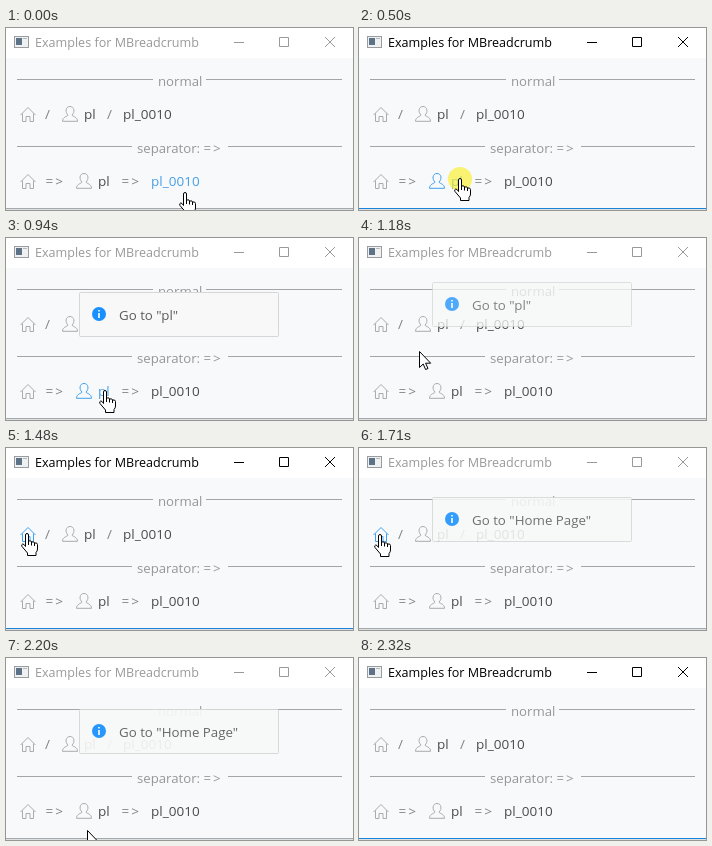
An HTML page for the animation above (2390 ms loop, 347 px wide and 182 px high).

```html
<!DOCTYPE html>
<html lang="en">
<head>
<meta charset="utf-8">
<title>Breadcrumb</title>
<style>
  html, body { margin: 0; width: 100%; height: 100%; overflow: hidden; background: #f7f9fa; }
  svg { display: block; }
  text { font: 13.5px "Open Sans", "Noto Sans", sans-serif; white-space: pre; }
  #win { --chrome: #999; --edge: #a5a9ac; }
  #win.active { --chrome: #000; --edge: #1883d7; }
  .title { font-size: 12.57px; fill: var(--chrome); }
  .buttons { stroke: var(--chrome); fill: none; }
  .edge { fill: var(--edge); }
  .rule { stroke: #a3a5a6; }
  .head { font-size: 13.2px; fill: #959797; }
  .sep { fill: #808284; }
  .arrow { letter-spacing: 2px; }
  .item { fill: #4c4c4c; stroke: none; }
  .item use { stroke: #a9abac; fill: none; }
  .item.hover { fill: #4a9fe8; }
  .item.hover use { stroke: #40a0f0; }
  .note text { font-size: 13.3px; fill: #5c5c5c; }
  .cursor { fill: #fff; stroke: #000; stroke-linejoin: round; }
</style>
</head>
<body>
<svg id="win" width="347" height="182" viewBox="0 0 347 182">
  <defs>
    <g id="home" stroke-linejoin="round">
      <path d="M-7.5 1L0-6.5 7.5 1M-5.5-.5V7.5H-2V2.5H2V7.5H5.5V-.5"/>
    </g>
    <g id="user">
      <path d="M-2 1C-5-1.5-4.7-7.5 0-7.5S5-1.5 2 1C2 2.5 7.5 2.5 7.5 7.3H-7.5C-7.5 2.5-2 2.5-2 1Z"/>
    </g>
  </defs>

  <rect width="347" height="182" fill="#f7f9fa"/>
  <rect width="347" height="30" fill="#fff"/>
  <g>
    <rect x="8.5" y="8.5" width="14" height="11" fill="#eef0f2" stroke="#9a9da0"/>
    <rect x="10" y="10" width="6" height="7" fill="#5d7287"/>
    <path d="M17 10.5H21" stroke="#b5b8ba"/>
  </g>
  <text class="title" x="29" y="19">Examples for MBreadcrumb</text>
  <path class="buttons" d="M228 14.5H238M273.5 9.5H282.5V18.5H273.5ZM319 9L329 19M329 9L319 19"/>

  <path class="rule" d="M11 51.5H147M200 51.5H336M11 118.5H126M222 118.5H336"/>
  <text class="head" x="152" y="58">normal</text>
  <text class="head" x="131" y="125">separator: <tspan class="arrow">=&gt;</tspan></text>

  <g id="crumbs"></g>

  <rect y="181" width="347" height="1" fill="#dde1e4"/>
  <rect class="edge" y="180" width="347" height="1"/>

  <g id="note" class="note">
    <rect x="73.5" y="54.5" width="199" height="44" rx="1" fill="#f8f8f8" stroke="#d6d6d6"/>
    <circle cx="93" cy="76" r="7" fill="#1890ff"/>
    <path d="M93 72V73.6M93 75V80" stroke="#fff" stroke-width="1.6"/>
    <text id="msg" x="113" y="82"></text>
  </g>

  <g id="pointer">
    <circle id="click" cy="1" r="12" fill="#faf028" opacity=".65"/>
    <path id="tip" class="cursor" d="M.5 .5V16.5L4.2 13 6.6 18.5 9 17.5 6.6 12.2H11.7Z"/>
    <g id="hand" class="cursor" transform="translate(-6 0)">
      <path d="M4.5 13.5V2Q4.5 .5 6 .5T7.5 2V8Q10.5 7.2 10.5 9 13.5 8.3 13.5 10 16.5 9.5 16.5 11.5V16Q16.5 18 15 19.5V22.5H6.5V20L1 13.5Q0 11.5 1.7 11 3 10.8 4.5 13.5Z"/>
      <path d="M7.5 8V12M10.5 9V12.5M13.5 10V13" fill="none"/>
    </g>
  </g>
</svg>
<script>
const LOOP = 2390, STEP = 30;
const $ = id => document.getElementById(id);

// Spans in which the picture advances in steps; it rests in between.
const spans = [[0, 0], [30, 300], [500, 500], [600, 780], [940, 1450],
               [1480, 1480], [1580, 1580], [1650, 1800], [1990, 2320]];

// Pointer path: time, x, y
const path = [[0, 179, 164], [300, 103, 151], [500, 101, 150], [780, 101, 150],
              [940, 99, 152], [1180, 60, 113], [1450, 21, 86], [1480, 21, 85],
              [1580, 21, 86], [1990, 21, 87], [2230, 90, 184], [2390, 90, 200]];

const clicks = [[500, 600], [1580, 1650]];
const idle = [[0, 30], [630, 1270], [1650, 2320]];
const notes = [
  { text: 'Go to "pl"', open: 600, close: 1090 },
  { text: 'Go to "Home Page"', open: 1620, close: 2140 }
];

const rows = [
  { y: 86, sep: "/", seps: [39, 101], home: 22, user: 64, pl: 78, last: 117 },
  { y: 153, sep: "=&gt;", seps: [39.5, 115.5], home: 22, user: 78, pl: 92, last: 145 }
];

const label = (x, y, s, cls = "") => `<text class="${cls}" x="${x}" y="${y + 5}">${s}</text>`;
const icon = (name, x, y) => `<use href="#${name}" x="${x}" y="${y}"/>`;

const zones = [];
function item(x0, x1, y, body) {
  zones.push({ x0, x1, y });
  return `<g class="item">${body}</g>`;
}

$("crumbs").innerHTML = rows.map(r =>
  item(r.home - 10, r.home + 11, r.y, icon("home", r.home, r.y)) +
  item(r.user - 10, r.pl + 14, r.y, icon("user", r.user, r.y) + label(r.pl, r.y, "pl")) +
  item(r.last - 2, r.last + 52, r.y, label(r.last, r.y, "pl_0010")) +
  r.seps.map(x => label(x, r.y, r.sep, "sep arrow")).join("")
).join("");
const items = document.querySelectorAll(".item");

const within = (list, t) => list.some(([a, b]) => t >= a && t < b);
const clamp = v => Math.min(1, Math.max(0, v));
const outCubic = p => 1 - (1 - p) ** 3;
const show = (el, on) => el.setAttribute("visibility", on ? "visible" : "hidden");

function snap(t) {
  const [a, b] = spans.filter(s => s[0] <= t).pop();
  return Math.min(b, a + Math.floor((t - a) / STEP) * STEP);
}

function pointerAt(t) {
  const i = Math.max(1, path.findIndex(p => p[0] >= t));
  const [t0, x0, y0] = path[i - 1], [t1, x1, y1] = path[i];
  const p = (t - t0) / (t1 - t0);
  return [x0 + (x1 - x0) * p, y0 + (y1 - y0) * p];
}

function draw(t) {
  $("win").classList.toggle("active", !within(idle, t));

  const [x, y] = pointerAt(t);
  let over = false;
  zones.forEach((z, i) => {
    const hit = x >= z.x0 && x <= z.x1 && Math.abs(y - z.y) <= 12.5;
    items[i].classList.toggle("hover", hit);
    over = over || hit;
  });
  $("pointer").setAttribute("transform", `translate(${Math.round(x)} ${Math.round(y)})`);
  show($("hand"), over);
  show($("tip"), !over);
  show($("click"), within(clicks, t));

  const n = t < 1500 ? notes[0] : notes[1];
  const p = t < n.close ? (t - n.open) / 180 : 1 - (t - n.close) / 144;
  const e = outCubic(clamp(p));
  $("msg").textContent = n.text;
  $("note").setAttribute("opacity", e);
  $("note").setAttribute("transform", `translate(0 ${Math.round(-40 * (1 - e))})`);
}

const start = performance.now();
function tick() {
  draw(snap((performance.now() - start) % LOOP));
  requestAnimationFrame(tick);
}
tick();
</script>
</body>
</html>
```
